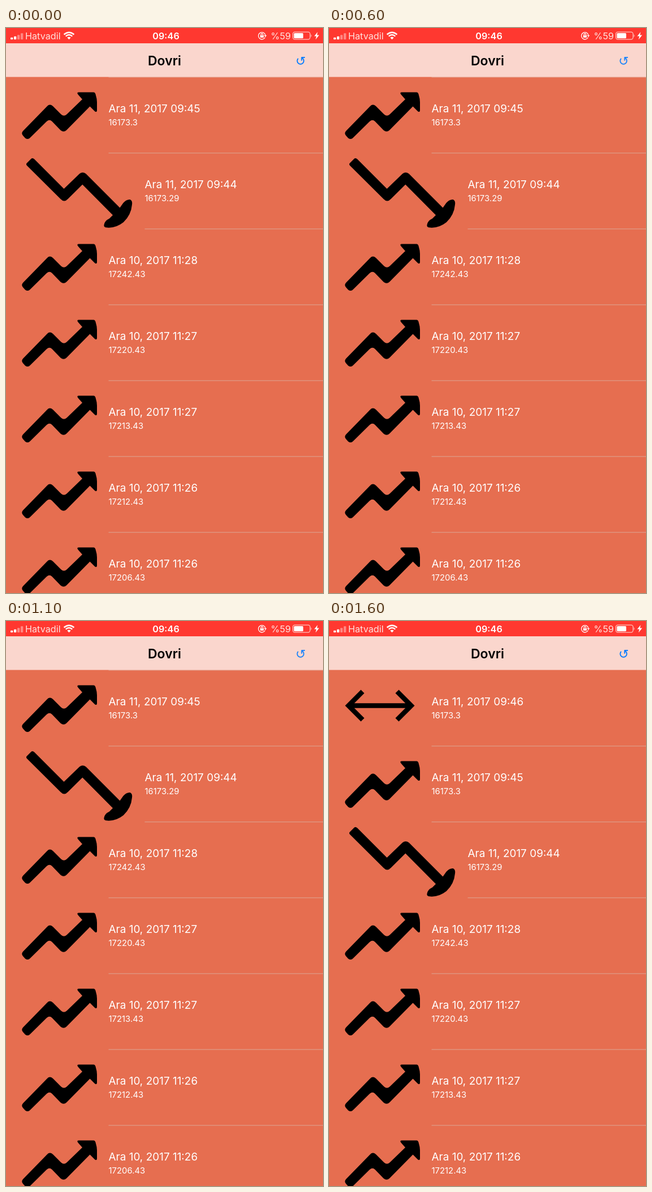
An HTML page that plays this animation: 561x998 px, repeating every 1.7 s.

```html
<!DOCTYPE html>
<html lang="tr">
<head>
<meta charset="utf-8">
<title>Price list</title>
<style>
  html, body { margin: 0; width: 100%; height: 100%; overflow: hidden; background: #e66e50; }
  svg { display: block; width: 561px; height: 998px; font-family: Inter, Roboto, sans-serif; }
  .date { font-size: 18.97px; fill: #fff; }
  .price { font-size: 14.9px; fill: #fff; }
  .status { font-size: 16.2px; fill: #ffe3df; }
  .line { fill: none; stroke: #fff; }
  #reload { font: 22px "DejaVu Sans", sans-serif; fill: #007aff; }
</style>
</head>
<body>
<svg viewBox="0 0 561 998">
  <defs>
    <path id="up" d="M30 182 L72 139 Q77.5 132.5 83.5 138.5 L97.5 152.5 Q102.5 157 107.5 152.5 L135 126 L127.500 117.5 Q124.5 113.5 129 113.5 H155 Q157.5 113.5 158.5 117 Q161 125 161 131 V145 Q161 149.5 157.5 147.500 L148.5 138.5 L107 180.5 Q102 185 96.5 180.5 L81.5 165 Q77 160.5 72 165 L43 193.5 Q39 198 34 194.5 L30 190 Q26.5 186 30 182 Z"/>
    <path id="down" d="M37 104.5 L45 96.5 Q47.5 95 50 97.5 L102.5 150 L130 123.5 Q135.5 119 141.5 123.5 L201.5 183.5 L207.5 175 Q213 168.5 219.5 169 Q224 170.5 223 178 Q221.5 196 208 209 Q194 220 179 218.5 Q172.5 218.5 173.5 213.5 Q174.5 206.5 183 202.5 L189 196.5 L135.3 142.5 L109.5 168 Q103 175 96.5 168 L37 109 Q34.8 106.5 37 104.5 Z"/>
    <path id="flat" d="M34 149.5 H146 M59.5 124.5 L34.5 149.5 L59.5 174.5 M120.5 124.5 L145.5 149.5 L120.5 174.5" fill="none" stroke="#000" stroke-width="8.5"/>
  </defs>

  <rect width="561" height="998" fill="#e66e50"/>
  <g id="list"></g>

  <rect width="561" height="27" fill="#ff3830"/>
  <rect y="27" width="561" height="59.5" fill="#fad6cd"/>
  <text x="280.5" y="66" text-anchor="middle" font-size="23" font-weight="600">Dovri</text>

  <g id="bars" fill="#fff"></g>
  <text class="status" x="34" y="20">Hatvadil</text>
  <g class="line" stroke-width="2.4">
    <path d="M102.6 11.5 Q111.5 3.8 120.4 11.5 M105.7 14.6 Q111.5 9.6 117.3 14.6"/>
    <path d="M108.3 17 Q111.5 14.3 114.7 17 L111.5 20.3 Z" fill="#fff" stroke="none"/>
  </g>
  <text x="283" y="20" text-anchor="middle" font-size="16.3" font-weight="600" fill="#fff">09:46</text>
  <g class="line" stroke-width="1.3">
    <path d="M458.5 16.5 A6.2 6.2 0 1 1 459 12.5"/>
    <path d="M456.6 12.8 H461.4 L459 16 Z M450 13 H456 V17 H450 Z" fill="#fff" stroke="none"/>
    <path d="M451.2 13 V11.8 A1.8 1.8 0 0 1 454.8 11.8 V13"/>
    <rect x="507.6" y="7.1" width="30.5" height="13" rx="3.5" stroke="#ffc4bf"/>
  </g>
  <text class="status" x="468.5" y="20">%59</text>
  <rect x="509.5" y="9" width="16.5" height="9.2" rx="1.5" fill="#fff"/>
  <path d="M539.5 11 Q541.8 13.6 539.5 16.2 Z" fill="#ffc4bf"/>
  <path d="M551.5 7 L545.5 14.5 H549.3 L547.8 20.5 L554.2 12.5 H550.3 Z" fill="#fff"/>

  <text id="reload" x="521.5" y="65.5" text-anchor="middle">↺</text>
</svg>

<script>
  const LOOP = 1700, ROW = 134;

  // The first row waits behind the header until the refresh arrives.
  const rows = [
    ["flat", "11, 2017 09:46", "16173.3"],
    ["up", "11, 2017 09:45", "16173.3"],
    ["down", "11, 2017 09:44", "16173.29"],
    ["up", "10, 2017 11:28", "17242.43"],
    ["up", "10, 2017 11:27", "17220.43"],
    ["up", "10, 2017 11:27", "17213.43"],
    ["up", "10, 2017 11:26", "17212.43"],
    ["up", "10, 2017 11:26", "17206.43"]
  ];

  const get = id => document.getElementById(id);

  get("list").innerHTML = rows.map(([icon, date, price], i) => {
    const x = icon === "down" ? 245.5 : 181.5;
    return `<g transform="translate(0 ${(i - 1) * ROW})">
      <use href="#${icon}"/>
      <text class="date" x="${x}" y="149.3">Ara ${date}</text>
      <text class="price" x="${x}" y="171.5">${price}</text>
      <rect x="${x}" y="220.4" width="${561 - x}" height="1" fill="#dca796"/>
    </g>`;
  }).join("");

  get("bars").innerHTML = [3.5, 5.5, 8, 11].map((h, i) =>
    `<rect x="${8 + i * 6}" y="${20.3 - h}" width="4.3" height="${h}" rx="1" opacity="${i < 2 ? 1 : .4}"/>`
  ).join("");

  const start = document.timeline.currentTime || 0;

  // Holds each value from its time until the next one.
  function hold(el, prop, steps) {
    const frames = steps.map(([ms, value]) =>
      ({ offset: Math.max(0, ms - 2) / LOOP, [prop]: value, easing: "steps(1, end)" }));
    frames.push({ offset: 1, [prop]: steps[steps.length - 1][1] });
    el.animate(frames, { duration: LOOP, iterations: Infinity }).startTime = start;
  }

  hold(get("list"), "transform", [[0, "translateY(0px)"], [1200, `translateY(${ROW}px)`]]);
  hold(get("reload"), "opacity", [[0, 1], [600, .9], [800, 1], [1100, .9], [1200, .85], [1300, .92], [1500, 1]]);
</script>
</body>
</html>
```
